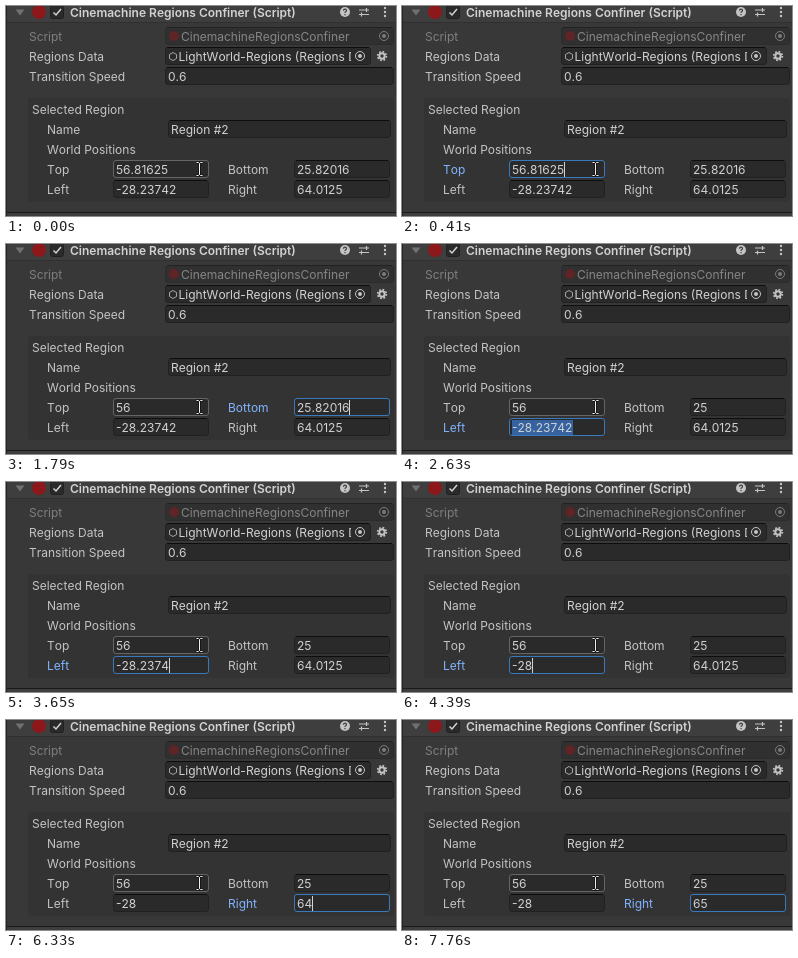
These frames come from a looping animation (390 px wide and 210 px high, 8190 ms). An HTML page:

```html
<!DOCTYPE html>
<html lang="en">
<head>
<meta charset="utf-8">
<title>Inspector fields</title>
<style>
  html, body { margin: 0; width: 100%; height: 100%; overflow: hidden; background: #383838; }
  svg { display: block; }
  text { font: 12px Inter, sans-serif; font-kerning: none; fill: #c4c4c4; white-space: pre; }
  .value { fill: #d2d2d2; }
  .title { font-weight: 600; fill: #d2d2d2; }
  .box { fill: #2a2a2a; stroke: #212121; }
  .hover { stroke: #656565; }
  .focus { stroke: #3a79bb; }
  text.active { fill: #81b4ff; }
  .dim { opacity: .5; }
  .line { fill: none; stroke: #c4c4c4; }
  .icon { fill: #c4c4c4; }
  .badge { fill: #8c181c; }
</style>
</head>
<body>
<svg id="stage" width="390" height="210" viewBox="0 0 390 210">
  <rect width="390" height="16" fill="#3e3e3e"/>
  <rect y="16" width="390" height="1" fill="#303030"/>
  <rect y="206" width="390" height="1" fill="#1a1a1a"/>
  <rect y="207" width="390" height="3" fill="#3e3e3e"/>
  <rect width="1" height="210" fill="#242424"/>
  <rect x="22" y="92" width="366" height="104" rx="3" fill="#333"/>

  <!-- component header -->
  <path d="M9.500 3.500h9l-4.500 6z" fill="#707070"/>
  <circle class="badge" cx="33" cy="6" r="7"/>
  <rect class="box" x="44.500" y="-.5" width="13" height="13" rx="2"/>
  <path d="M47.500 6.500l2.500 2.500 5-6" fill="none" stroke="#d2d2d2" stroke-width="1.500"/>
  <text class="title" x="64" y="11">Cinemachine Regions Confiner (Script)</text>
  <circle class="icon" cx="339" cy="6" r="5"/>
  <path d="M337.500 4.800q0-1.600 1.500-1.600t1.500 1.400q0 .8-.8 1.200t-.7 1.200M339 8v1.200" fill="none" stroke="#3e3e3e" stroke-width="1.200"/>
  <path class="line" d="M353 4h10M353 8.500h10M360.500 2v4M355.500 6.500v4" stroke-width="1.200"/>
  <g class="icon">
    <circle cx="379" cy="2" r="1.200"/><circle cx="379" cy="6" r="1.200"/><circle cx="379" cy="10" r="1.200"/>
  </g>

  <g id="rows"></g>

  <!-- object field icons -->
  <circle class="badge dim" cx="168" cy="30" r="5"/>
  <path class="line" d="M167 46.500l3.500 2v4l-3.500 2-3.500-2v-4z" stroke-width=".8"/>
  <g class="dim"><circle class="line" cx="378" cy="30" r="4.500"/><circle class="icon" cx="378" cy="30" r="2"/></g>
  <circle class="line" cx="354" cy="50" r="4.500"/><circle class="icon" cx="354" cy="50" r="2"/>
  <circle class="line" cx="376" cy="50" r="2.700" stroke-width="2"/>
  <circle class="line" cx="376" cy="50" r="4.400" stroke-width="1.600" stroke-dasharray="1.728"/>

  <g id="inputs"></g>

  <!-- text pointer -->
  <g fill="none">
    <path id="beam" d="M190.500 156.500h2l1 1 1-1h2M190.500 169.500h2l1-1 1 1h2M193.500 157.500v11" stroke="#111" stroke-width="2.400"/>
    <path d="M190.500 156.500h2l1 1 1-1h2M190.500 169.500h2l1-1 1 1h2M193.500 157.500v11" stroke="#f0f0f0"/>
  </g>
</svg>
<script>
const LOOP = 8190;
const rows = document.getElementById('rows');
const inputs = document.getElementById('inputs');

function add(parent, tag, attrs, content = '') {
  const el = document.createElementNS('http://www.w3.org/2000/svg', tag);
  for (const key in attrs) el.setAttribute(key, attrs[key]);
  el.textContent = content;
  return parent.appendChild(el);
}

const label = (parent, x, y, content, cls = '') =>
  add(parent, 'text', { x, y: y + 14, class: cls }, content);

function box(parent, x, y, right) {
  const el = add(parent, 'rect',
    { x: x + .5, y: y + .5, width: right - x - 1, height: 17, rx: 2.5, class: 'box' });
  add(parent, 'rect', { x: x + 2, y, width: right - x - 4, height: 1, fill: '#0d0d0d' });
  return el;
}

const script = add(rows, 'g', { class: 'dim' });
label(script, 23, 21, 'Script');
box(script, 159, 21, 388);
label(script, 175, 21, 'CinemachineRegionsConfiner', 'value');

label(rows, 23, 41, 'Regions Data');
box(rows, 159, 41, 365);
const clipped = add(rows, 'svg', { x: 160, y: 41, width: 185, height: 18 });
label(clipped, 12.5, 0, 'LightWorld-Regions (Regions Data)', 'value');

label(rows, 23, 61, 'Transition Speed');
box(rows, 159, 61, 388);
label(rows, 162, 61, '0.6', 'value');

label(rows, 26, 94, 'Selected Region');
label(rows, 41, 114, 'Name');
box(rows, 162, 114, 385);
label(rows, 165, 114, 'Region #2', 'value');
label(rows, 41, 134, 'World Positions');

// Each field is focused, selected, given a caret, then trimmed one character per cut.
const fields = [
  { name: 'Top', start: '56.81625', x: 107, y: 154, focus: 80, select: 80, caret: 410, leave: 1360,
    cuts: [490, 670, 850, 1030, 1130] },
  { name: 'Bottom', start: '25.82016', x: 288, y: 154, focus: 1360, select: 1460, caret: 1790, leave: 2520,
    cuts: [1840, 1970, 2170, 2280, 2390] },
  { name: 'Left', start: '-28.23742', x: 107, y: 174, focus: 2520, select: 2630, caret: 3190, leave: 4700,
    cuts: [3650, 3830, 3960, 4110, 4240, 4390] },
  { name: 'Right', start: '64.0125', x: 288, y: 174, focus: 4700, select: 4700, caret: 5080, leave: LOOP,
    cuts: [5540, 5670, 5870, 6000, 6330, 6740], typed: [7430, '5'], blink: 7760 },
];

for (const f of fields) {
  f.label = label(inputs, f.x === 107 ? 41 : 222, f.y, f.name);
  f.box = box(inputs, f.x, f.y, f.x + 96);
  f.edge = f.box.nextSibling;
  f.mark = add(inputs, 'rect', { x: f.x + 3, y: f.y + 2, height: 15 });
  f.text = label(inputs, f.x + 3, f.y, f.start, 'value');
}

function valueAt(f, t) {
  const cut = f.cuts.filter(time => t >= time).length;
  let value = f.start.slice(0, f.start.length - cut);
  if (f.typed && t >= f.typed[0]) value += f.typed[1];
  return t >= f.leave ? value.replace(/\.$/, '') : value;
}

function draw(t) {
  for (const f of fields) {
    const active = t >= f.focus && t < f.leave;
    const hovered = f.name === 'Top';
    const value = valueAt(f, t);
    if (f.text.textContent !== value) f.text.textContent = value;

    f.label.setAttribute('class', active ? 'active' : '');
    f.box.setAttribute('class', 'box ' + (active ? 'focus' : hovered ? 'hover' : ''));
    f.edge.setAttribute('visibility', active || hovered ? 'hidden' : 'visible');

    const selected = active && t >= f.select && t < f.caret;
    const caret = active && t >= f.caret && !(t >= f.blink);
    const width = f.text.getComputedTextLength();
    f.mark.setAttribute('visibility', selected || caret ? 'visible' : 'hidden');
    f.mark.setAttribute('x', f.x + 3 + (selected ? 0 : Math.floor(width)));
    f.mark.setAttribute('width', selected ? Math.ceil(width) : 1);
    f.mark.setAttribute('fill', selected ? '#3662a0' : '#d2d2d2');
  }
}

const began = performance.now();
function tick() {
  draw((performance.now() - began) % LOOP);
  requestAnimationFrame(tick);
}
tick();
</script>
</body>
</html>
```
